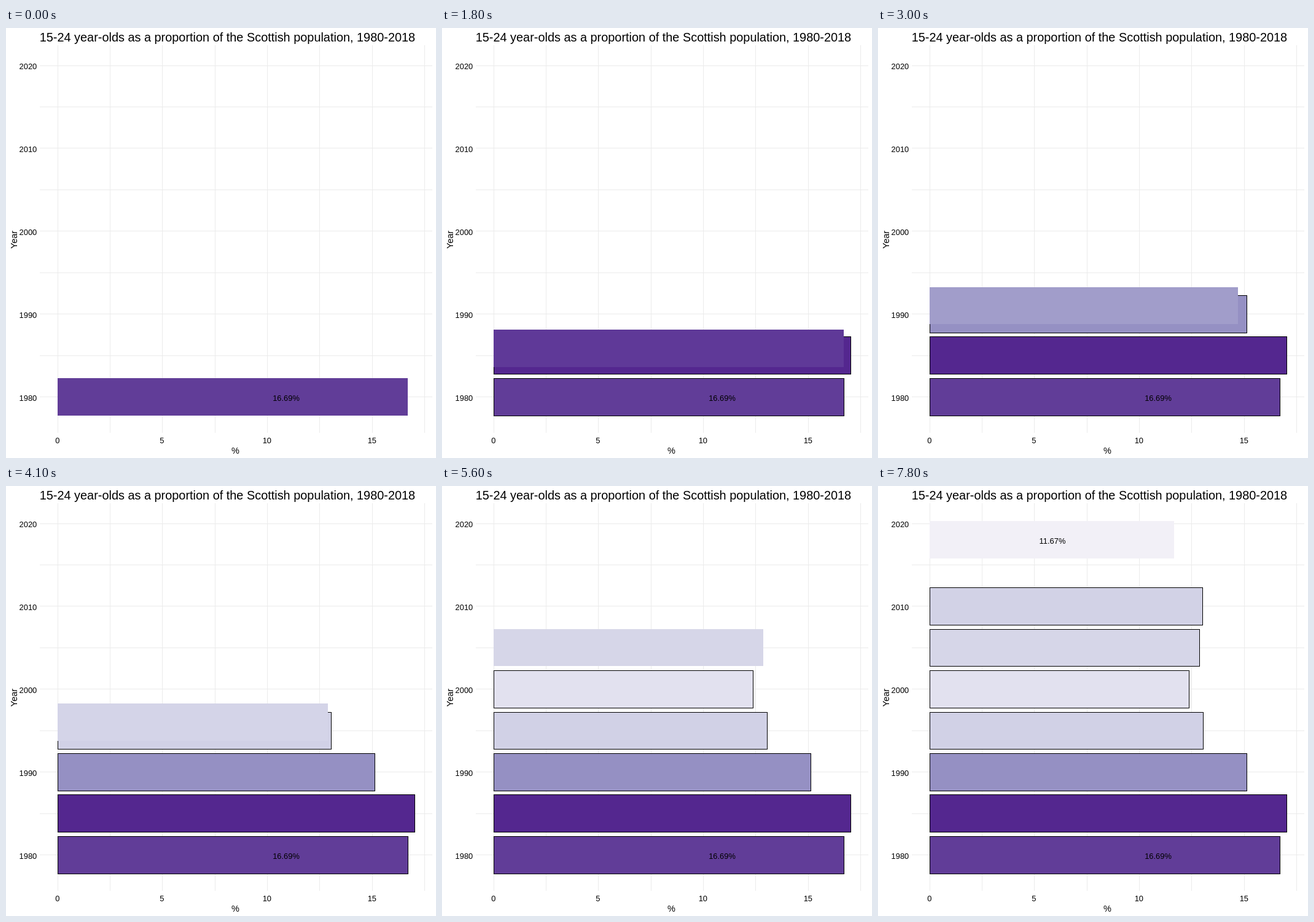
Write an HTML page that moves like this. It is 700x700 px and loops after 10000 ms.

```html
<!DOCTYPE html>
<html lang="en">
<head>
<meta charset="utf-8">
<title>Population share by year</title>
<style>
  html, body { margin: 0; width: 100%; height: 100%; overflow: hidden; background: #fff; }
  svg { display: block; width: 100%; height: 100%; }
  text { font: 12.9px "Liberation Sans", Arial, sans-serif; fill: #000; }
  .title { font-size: 19.9px; }
  .name { font-size: 14.5px; }
  .mid { text-anchor: middle; }
  .end { text-anchor: end; }
  rect { shape-rendering: crispEdges; }
</style>
</head>
<body>
<svg viewBox="0 0 700 700">
  <rect width="700" height="700" fill="#fff"/>
  <g id="grid"></g>
  <g id="bars"></g>
  <g id="labels"></g>
  <text class="title" x="54.7" y="22">15-24 year-olds as a proportion of the Scottish population, 1980-2018</text>
  <text class="name mid" x="373.5" y="693">%</text>
  <text class="name mid" transform="translate(18 344.5) rotate(-90)">Year</text>
</svg>
<script>
const LOOP = 10000, STEP = 100;
const LEFT = 84, BAR_H = 60.7, LABEL_SHIFT = 198;

// year, right edge, fill, label
const states = [
  [1980, 654, [97, 61, 152], "16.69%"],
  [1985, 665, [84, 39, 143], ""],
  [1990, 600, [149, 144, 195], ""],
  [1995, 529, [209, 209, 230], ""],
  [2000, 506, [226, 225, 239], ""],
  [2005, 523, [214, 214, 232], ""],
  [2010, 528, [210, 210, 230], ""],
  [2018, 482, [242, 240, 247], "11.67%"]
].map(([year, right, fill, label]) =>
  ({ top: 569.9 - (year - 1980) * 13.49, right, fill, label }));

// start time and number of steps of each move
const moves = [[600, 6], [1800, 6], [3000, 5], [4100, 5], [5200, 5], [6300, 5], [7400, 5]];

const byId = id => document.getElementById(id);

function add(parent, tag, attrs, text = "") {
  const el = document.createElementNS("http://www.w3.org/2000/svg", tag);
  set(el, attrs);
  el.textContent = text;
  return parent.appendChild(el);
}

function set(el, attrs) {
  for (const key in attrs) el.setAttribute(key, attrs[key]);
}

function barAttrs({ top, right, fill }, inset = 0) {
  const y = Math.round(top);
  return {
    x: LEFT + inset,
    y: y + inset,
    width: Math.round(right) - LEFT,
    height: Math.round(top + BAR_H) - y,
    fill: `rgb(${fill.map(Math.round)})`
  };
}

const labelAttrs = s => ({
  class: "mid",
  x: Math.round(s.right) - LABEL_SHIFT,
  y: Math.round(s.top + BAR_H / 2 + 6.5)
});

function drawGrid() {
  const grid = byId("grid");
  const line = (x, y, width, height) => add(grid, "rect", { x, y, width, height, fill: "#ebebeb" });
  for (let i = 0; i < 9; i++) {
    line(55, Math.floor(600.6 - i * 67.45), 639, 1);
    if (i % 2 === 0) add(grid, "text", { class: "end", x: 50.3, y: 607 - i * 67.5 }, 1980 + i * 5);
  }
  for (let i = 0; i < 8; i++) {
    const x = Math.floor(84 + i * 85.38);
    line(x, 28, 1, 631);
    if (i % 2 === 0) add(grid, "text", { class: "mid", x: x - 0.2, y: 676 }, i * 2.5);
  }
}

const mix = (a, b, f) => a + (b - a) * f;

function poseAt(time) {
  const past = moves.filter(([start]) => time >= start).length;
  if (!past) return { past, ...states[0] };
  const [start, steps] = moves[past - 1];
  const f = Math.min(1, (Math.floor((time - start) / STEP) + 1) / steps);
  const a = states[past - 1], b = states[past];
  return {
    past,
    top: mix(a.top, b.top, f),
    right: mix(a.right, b.right, f),
    fill: a.fill.map((c, i) => mix(c, b.fill[i], f)),
    label: f < 0.5 ? a.label : b.label
  };
}

drawGrid();
const trail = states.slice(0, -1).map(s => ({
  bar: add(byId("bars"), "rect", { ...barAttrs(s, 0.5), stroke: "#000", "stroke-width": 1, "shape-rendering": "auto" }),
  label: add(byId("labels"), "text", labelAttrs(s), s.label)
}));
const bar = add(byId("bars"), "rect", {});
const label = add(byId("labels"), "text", {});

function render(time) {
  const pose = poseAt(time);
  trail.forEach((mark, i) => {
    const display = i < pose.past ? "inline" : "none";
    set(mark.bar, { display });
    set(mark.label, { display });
  });
  set(bar, barAttrs(pose));
  set(label, labelAttrs(pose));
  label.textContent = pose.label;
}

let origin;
function tick(now) {
  origin ??= now;
  render((now - origin) % LOOP);
  requestAnimationFrame(tick);
}
render(0);
requestAnimationFrame(tick);
</script>
</body>
</html>
```
